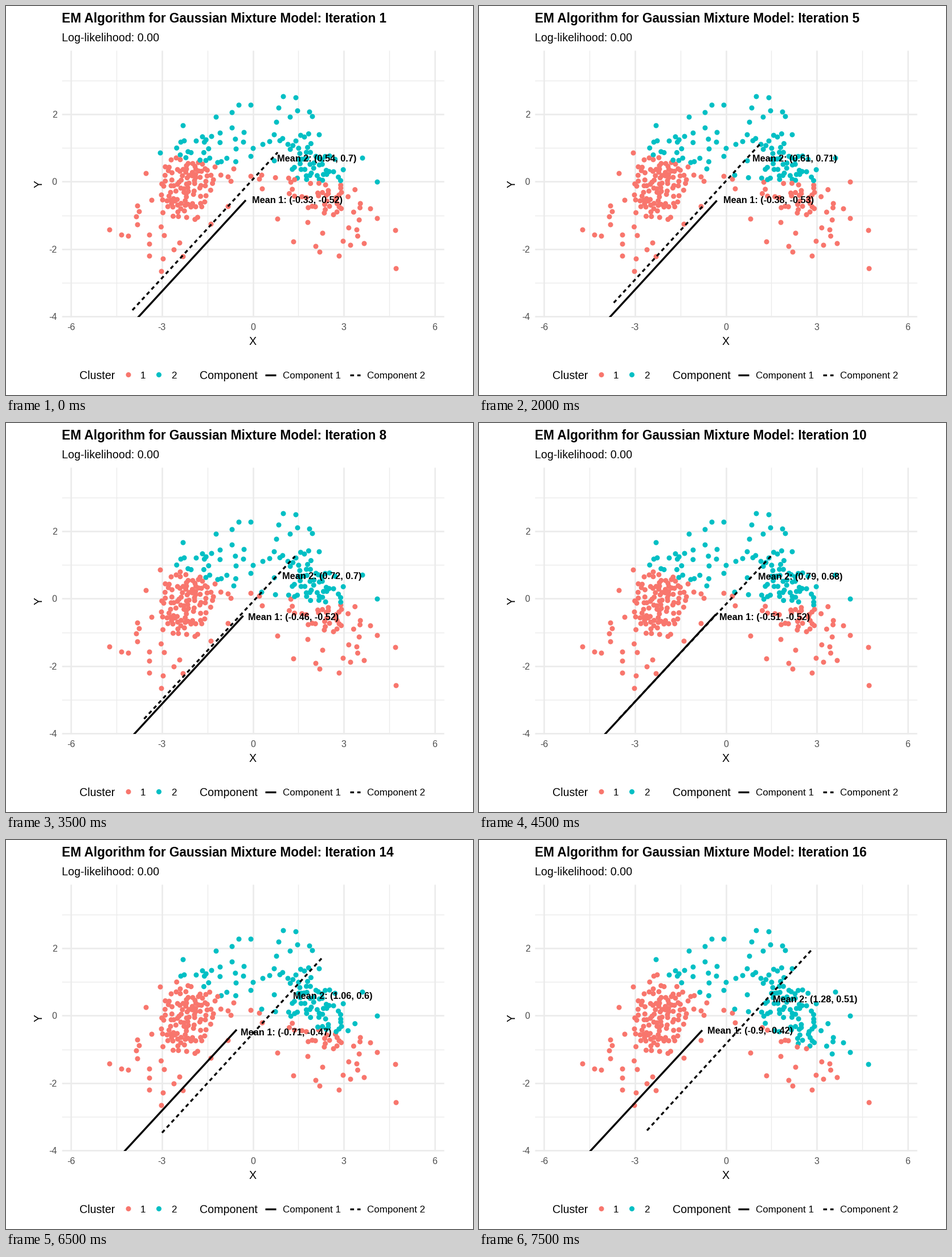
A matplotlib script that plays this animation: 820x683 px, repeating every 8000 ms.

```python
import numpy as np
import matplotlib.pyplot as plt
from matplotlib.animation import FuncAnimation
from matplotlib.patches import Rectangle

W, H, DPI = 820, 683, 64
PT = 72 / DPI
X0, Y0, SX, SY = 433.5, 308.4, 53.25, 59.15
LEFT, RIGHT, TOP, BOTTOM = 98, 769, 78, 545.5
RED, TEAL = "#F8766D", "#00BFC4"
GRID, TICK = "#EBEBEB", "#4D4D4D"

plt.rcParams["font.family"] = "Liberation Sans"
fig = plt.figure(figsize=(W / DPI, H / DPI), dpi=DPI, facecolor="white")
ax = fig.add_axes([0, 0, 1, 1])
ax.set_xlim(0, W)
ax.set_ylim(H, 0)
ax.axis("off")


def px(x):
    return X0 + SX * x


def py(y):
    return Y0 - SY * y


def label(x, y, s, size, **kw):
    return ax.text(x, y, s, fontsize=size * PT,
                   **{"va": "baseline", "color": "black", **kw})


def stroke(x, y, width, color="black", **kw):
    return ax.plot(x, y, lw=width * PT, color=color,
                   solid_capstyle="butt", dash_capstyle="butt", **kw)[0]


# Grid and axes
for v in np.arange(-6, 6.1, 1.5):
    stroke([px(v)] * 2, [TOP, BOTTOM], 2.6 if v % 3 == 0 else 1.4, GRID, zorder=1)
for v in range(-4, 4):
    stroke([LEFT, RIGHT], [py(v)] * 2, 2.6 if v % 2 == 0 else 1.4, GRID, zorder=1)
for v in range(-6, 7, 3):
    label(px(v), 569, str(v), 16, color=TICK, ha="center")
for v in range(-4, 3, 2):
    label(89.5, py(v) + 6, str(v), 16, color=TICK, ha="right")
label(433.5, 595, "X", 19.6, ha="center")
label(58.5, 312, "Y", 19.6, ha="center", va="center", rotation=90)

# Headings
title = label(97.5, 29, "", 22.65, weight="bold")
label(97.5, 62, "Log-likelihood: 0.00", 19.65)

# Legend
DOT = (9 * PT) ** 2
DASH = (0, (2, 1.75))
label(129.5, 655, "Cluster", 19.6)
label(340, 655, "Component", 19.6)
ax.scatter([215, 268.5], [647.5] * 2, s=DOT, c=[RED, TEAL], linewidths=0)
for x, s in [(236, "1"), (290, "2"), (486, "Component 1"), (633.5, "Component 2")]:
    label(x, 654, s, 17)
stroke([455, 474], [647.5] * 2, 3.3)
stroke([604, 622], [647.5] * 2, 3.3, ls=DASH)

# Sparse outer points, in pixels; the dense cores are sampled
outer = [
    (182, 393), (203, 402), (215, 404), (246, 294), (229, 370), (231, 384),
    (234, 361), (231, 351), (271, 258), (252, 402), (252, 418), (252, 439),
    (276, 444), (273, 466), (295, 428), (311, 440), (305, 416), (278, 403),
    (256, 341), (307, 239), (311, 210), (369, 195), (397, 187), (409, 174),
    (430, 174), (397, 214), (376, 223), (418, 222), (404, 251), (430, 264),
    (434, 250), (417, 239), (360, 383), (390, 352), (390, 300), (400, 286),
    (430, 299), (445, 304), (450, 321), (449, 297), (334, 237), (361, 229),
    (451, 243), (463, 238), (475, 204), (479, 179), (487, 159), (509, 161),
    (499, 195), (512, 184), (533, 186), (538, 194), (550, 226), (471, 226),
    (524, 230), (652, 309), (640, 356), (652, 373), (684, 394), (685, 461),
    (585, 439), (551, 432), (544, 422), (605, 420), (629, 417), (592, 413),
    (505, 414), (477, 374), (616, 393), (626, 267),
]
rng = np.random.default_rng(12)
points = [np.array(p, float) for p in outer]


def add_core(n, center, sd, corr, xs, ys):
    """Sample a correlated Gaussian inside a box with a small spacing."""
    cov = corr * sd[0] * sd[1]
    cov = [[sd[0] ** 2, cov], [cov, sd[1] ** 2]]
    while n:
        p = rng.multivariate_normal(center, cov)
        inside = xs[0] < p[0] < xs[1] and ys[0] < p[1] < ys[1]
        if inside and min(np.hypot(*(p - q)) for q in points) > 4.5:
            points.append(p)
            n -= 1


add_core(122, (322, 306), (32, 38), -0.6, (270, 415), (228, 392))
add_core(98, (546, 305), (38, 44), 0.6, (469, 624), (222, 412))
points = np.array(points)
u = (points[:, 0] - X0) / SX
v = (Y0 - points[:, 1]) / SY
dots = ax.scatter(*points.T, s=DOT, linewidths=0, zorder=2)

# Component lines and mean labels
panel = Rectangle((LEFT, TOP), RIGHT - LEFT, BOTTOM + 0.5 - TOP,
                  transform=ax.transData)
solid = stroke([], [], 3.4, zorder=3)
solid.set_clip_path(panel)
dashed = stroke([], [], 3.3, ls=DASH, zorder=3)
tags = [label(0, 0, "", 16.25, weight="bold", zorder=4) for _ in range(2)]

# Values at key iterations, linear in between
keys = [1, 3, 6, 10, 12, 14, 16]
means = [
    [-.33, -.35, -.40, -.51, -.60, -.71, -.90],
    [-.52, -.53, -.53, -.52, -.50, -.47, -.42],
    [.54, .55, .64, .79, .91, 1.06, 1.28],
    [.70, .71, .71, .68, .66, .60, .51],
]
solid_ends = [
    [421, 419, 417, 416, 411, 405, 392],
    [341, 343, 341, 336, 336, 333, 334],
    [233, 232.5, 229.5, 222, 217, 209, 196],
]
dash_ends = [
    [222, 232, 239, 246, 261, 274, 295],
    [534, 523, 520, 519, 515, 514, 510],
    [477, 488, 499, 516, 533, 554, 583],
    [257, 245, 238, 230, 219, 208, 194],
]
# Cluster boundary: y = c + b x + a x^2
boundary = [
    [.30, .12, .20, .18, .18, .17, .20],
    [-.15, -.14, -.19, -.22, -.26, -.33, -.48],
    [.005, .034, .035, .03, .03, .03, .02],
]


def at(rows, it):
    return [np.interp(it, keys, row) for row in rows]


def update(i):
    it = i + 1
    title.set_text(f"EM Algorithm for Gaussian Mixture Model: Iteration {it}")

    c, b, a = at(boundary, it)
    dots.set_facecolor(np.where(v > c + b * u + a * u * u, TEAL, RED))

    m = at(means, it)
    for k, tag in enumerate(tags):
        x, y = m[2 * k:2 * k + 2]
        s = f"Mean {k + 1}: ({round(x, 2):g}, {round(y, 2):g})"
        tag.set_text(s)
        tag.set_position((px(x) + 0.72 * len(s), py(y) + 6.5))

    x1, y1, x0 = at(solid_ends, it)
    slope = (BOTTOM - y1) / (x0 - x1)
    solid.set_data([x1, x0 - 20], [y1, BOTTOM - 20 * slope])

    x0, y0, x1, y1 = at(dash_ends, it)
    dashed.set_data([x0, x1], [y0, y1])
    return [title, dots, solid, dashed, *tags]


anim = FuncAnimation(fig, update, frames=16, interval=500, repeat=True,
                     repeat_delay=0, blit=False)
plt.show()
```
